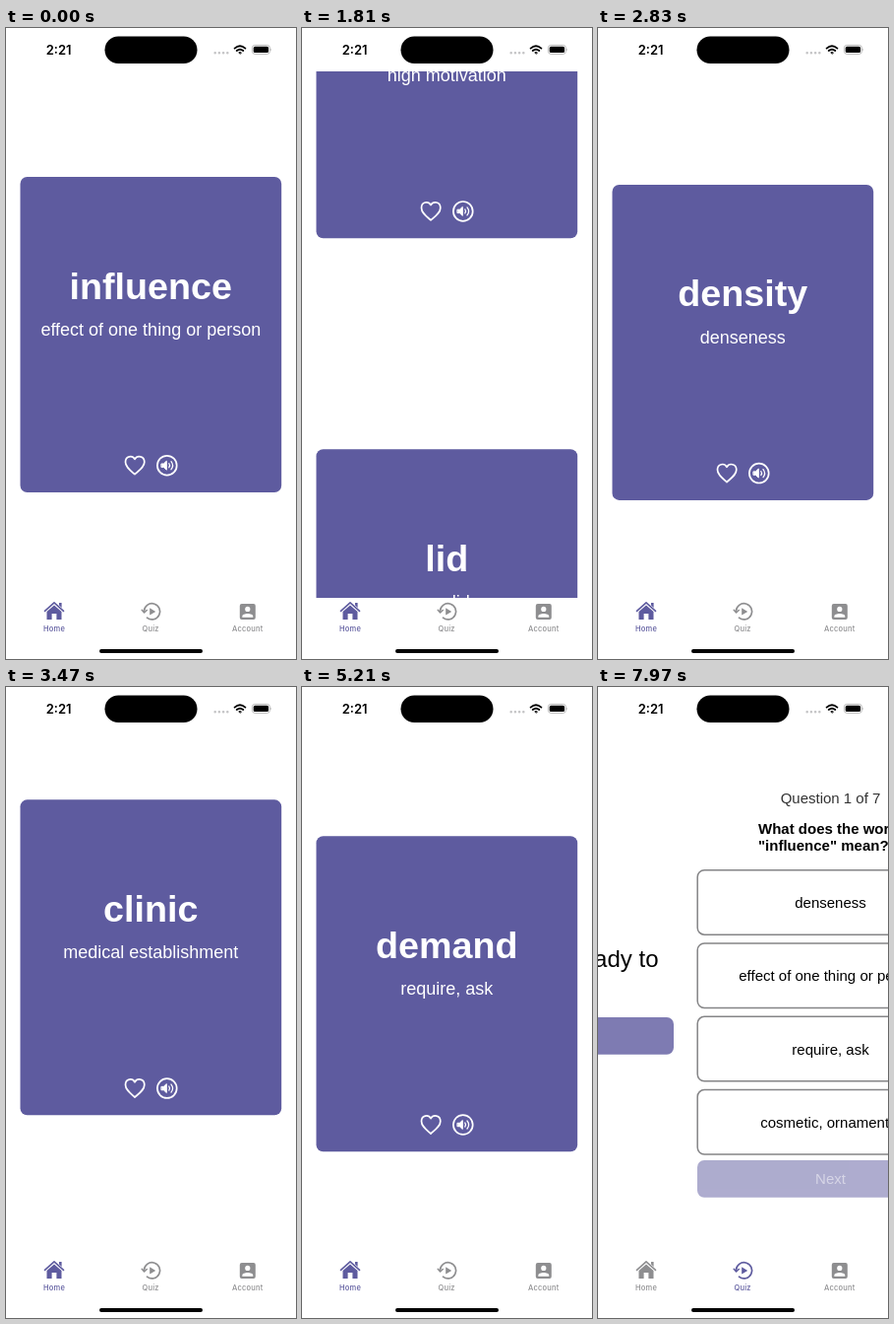
Animation of 295x640 px, one loop 8000 ms. Source, as an HTML page:

```html
<!DOCTYPE html>
<html lang="en">
<head>
<meta charset="utf-8">
<title>Vocabulary cards</title>
<style>
  html, body { margin: 0; width: 100%; height: 100%; overflow: hidden; background: #fff; }
  svg { display: block; width: 295px; height: 640px; }
  text { font-family: "Liberation Sans", Arial, sans-serif; font-size: 15px; }
  .mid { text-anchor: middle; }
  .word { font-size: 37.7px; font-weight: bold; }
  .note { font-size: 18px; }
  .ask { font-size: 24px; }
  .bold { font-weight: bold; }
  .light { fill: #333; }
  .clock { font: 600 13px Inter, sans-serif; }
  .label { font: 500 7.5px Inter, sans-serif; letter-spacing: .2px; }
  .line { fill: none; stroke-linecap: round; stroke-linejoin: round; }
</style>
</head>
<body>
<svg viewBox="0 0 295 640">
  <defs>
    <clipPath id="view"><rect y="44" width="295" height="534"/></clipPath>
    <g id="actions" class="line" stroke="#fff" stroke-width="1.7">
      <path d="M131 452.700C126 448.300 121.500 445 121.500 440.200C121.500 434.200 128.500 432.800 131 437.400C133.500 432.800 140.800 434.200 140.800 440.200C140.800 445 136 448.300 131 452.700Z"/>
      <circle cx="163.800" cy="443.700" r="9.900"/>
      <path d="M158.300 442h2l3-2.800v9l-3-2.800h-2z" fill="#fff" stroke-width="1"/>
      <path d="M165.800 441.700q1.500 2 0 4M168 439.700q3.200 4 0 8" stroke-width="1.300"/>
    </g>
  </defs>

  <g clip-path="url(#view)">
    <g id="cards"></g>
    <g id="intro">
      <text class="ask" x="20.700" y="284">Great! are you ready to</text>
      <text class="ask" x="20.700" y="311.700">start the quiz?</text>
      <g id="start">
        <rect x="12" y="335" width="271" height="37.700" rx="7" fill="#5e5b9f"/>
        <text class="mid" x="147.500" y="359" fill="#fff">Start Quiz</text>
      </g>
    </g>
    <g id="question">
      <text class="mid light" x="147.500" y="118">Question 1 of 7</text>
      <text class="bold" x="74" y="149">What does the word</text>
      <text class="bold" x="74" y="166">"influence" mean?</text>
      <g id="options"></g>
      <g opacity=".5">
        <rect x="12" y="480" width="271" height="37.700" rx="7" fill="#5e5b9f"/>
        <text class="mid" x="147.500" y="504" fill="#fff" fill-opacity=".5">Next</text>
      </g>
    </g>
  </g>

  <!-- status bar -->
  <text class="clock mid" x="53.700" y="26.700">2:21</text>
  <rect x="100.500" y="8.500" width="94" height="27.500" rx="13.750"/>
  <path class="line" d="M212.700 25.300h12.700" stroke="#c4c4c6" stroke-width="2.600" stroke-dasharray="0 4.200"/>
  <g class="line" stroke="#000" stroke-width="1.900" stroke-linecap="butt">
    <path d="M232.600 20.600q5.400-4.600 10.800 0M234.700 23q3.300-2.700 6.600 0"/>
    <path d="M238 26.300l-1.300-1.500q1.300-1 2.600 0z" fill="#000" stroke-width=".6"/>
  </g>
  <rect x="250.400" y="17.400" width="18" height="9" rx="2.800" fill="none" stroke="#aaa" stroke-width=".8"/>
  <rect x="251.700" y="18.700" width="15.400" height="6.400" rx="1.700"/>
  <path d="M269.400 20.400q1.500 1.500 0 3z" fill="#aaa"/>

  <!-- tab bar -->
  <g id="home">
    <path class="line" d="M39.500 591.400L49 582.800L58.500 591.400" stroke="currentColor" stroke-width="1.600"/>
    <path d="M54 583h2.600v5l-2.600-2.400zM49 585.500l7.500 6.600v7.900h-5.100v-6h-4.800v6h-5.100v-7.900z" fill="currentColor"/>
    <text class="label mid" x="49" y="611.500" fill="currentColor">Home</text>
  </g>
  <g id="quiz">
    <path class="line" d="M140.400 591.500A8.100 8.100 0 1 1 143.500 598.200" stroke="currentColor" stroke-width="1.700"/>
    <path class="line" d="M138.200 590.300l2.400 2.700 2.700-2.500" stroke="currentColor" stroke-width="1.500"/>
    <path d="M146.200 588.300l6 3.600-6 3.600z" fill="currentColor"/>
    <text class="label mid" x="147.200" y="611.500" fill="currentColor">Quiz</text>
  </g>
  <g color="#8e8e90">
    <rect x="237.800" y="584" width="16" height="16" rx="2" fill="currentColor"/>
    <circle cx="245.800" cy="589.400" r="2.600" fill="#fff"/>
    <path d="M240.300 597.800v-1c0-3.800 11-3.800 11 0v1z" fill="#fff"/>
    <text class="label mid" x="245.800" y="611.500" fill="currentColor">Account</text>
  </g>
  <rect x="95" y="630" width="105" height="4" rx="2"/>
</svg>

<script>
const LOOP = 8000, PAGE = 534, WIDTH = 295, QUIZ_AT = 6240;
const ACTIVE = "#5e5b9f", IDLE = "#8e8e90";
const $ = id => document.getElementById(id);

const words = [
  ["influence", "effect of one thing or person"],
  ["drive", "high motivation"],
  ["lid", "eyelid"],
  ["density", "denseness"],
  ["clinic", "medical establishment"],
  ["spin", "form a web"],
  ["demand", "require, ask"]
];
const answers = ["denseness", words[0][1], "require, ask", "cosmetic, ornamental"];

$("cards").innerHTML = words.map(([word, note], i) => `
  <g transform="translate(0 ${i * PAGE})" fill="#fff">
    <rect x="14.500" y="151" width="265.700" height="320" rx="7" fill="${ACTIVE}"/>
    <text class="word mid" x="147.300" y="274.600">${word}</text>
    <text class="note mid" x="147.300" y="312">${note}</text>
    <use href="#actions"/>
  </g>`).join("");

$("options").innerHTML = answers.map((answer, i) => `
  <rect x="12.200" y="${185.7 + i * 74.3}" width="270.600" height="65.500" rx="7" fill="none" stroke="#858587" stroke-width="1.500"/>
  <text class="mid" x="147.500" y="${224 + i * 74.3}">${answer}</text>`).join("");

// One swipe per page: start, end, steps between them, phase of the first step.
const swipes = [
  [1030, 1340, 3, .5],
  [1590, 2040, 4, .5],
  [2380, 2730, 3, .46],
  [2840, 3190, 3, .5],
  [3470, 3910, 4, .55],
  [4770, 5210, 4, .49]
];
const push = [[0, WIDTH], [7850, 245], [7970, 89]];
const press = [[0, 1], [7740, .4], [7850, .45], [7970, .8]];

const held = (keys, t) => keys.findLast(([at]) => at <= t)[1];
const move = (id, x, y) => $(id).setAttribute("transform", `translate(${x} ${y})`);
const show = (id, on) => $(id).setAttribute("display", on ? "inline" : "none");

// The drag speeds up, then the page settles; the screen refreshes once per step.
function scrolled(t) {
  const page = swipes.findLastIndex(([start]) => start <= t);
  if (page < 0) return 0;
  const [start, end, steps, phase] = swipes[page];
  const step = Math.min(steps, Math.floor((t - start) / (end - start) * steps));
  return PAGE * (page + 1 - Math.exp(-.268 * (step + phase) ** 2.22));
}

function draw(t) {
  const quiz = t >= QUIZ_AT, x = held(push, t);
  show("cards", !quiz);
  show("intro", quiz);
  show("question", quiz);
  move("cards", 0, -scrolled(t));
  move("intro", x - WIDTH, 0);
  move("question", x, 0);
  $("start").setAttribute("opacity", held(press, t));
  $("home").setAttribute("color", quiz ? IDLE : ACTIVE);
  $("quiz").setAttribute("color", quiz ? ACTIVE : IDLE);
}

const began = performance.now();
function tick() {
  draw((performance.now() - began) % LOOP);
  requestAnimationFrame(tick);
}
tick();
</script>
</body>
</html>
```
